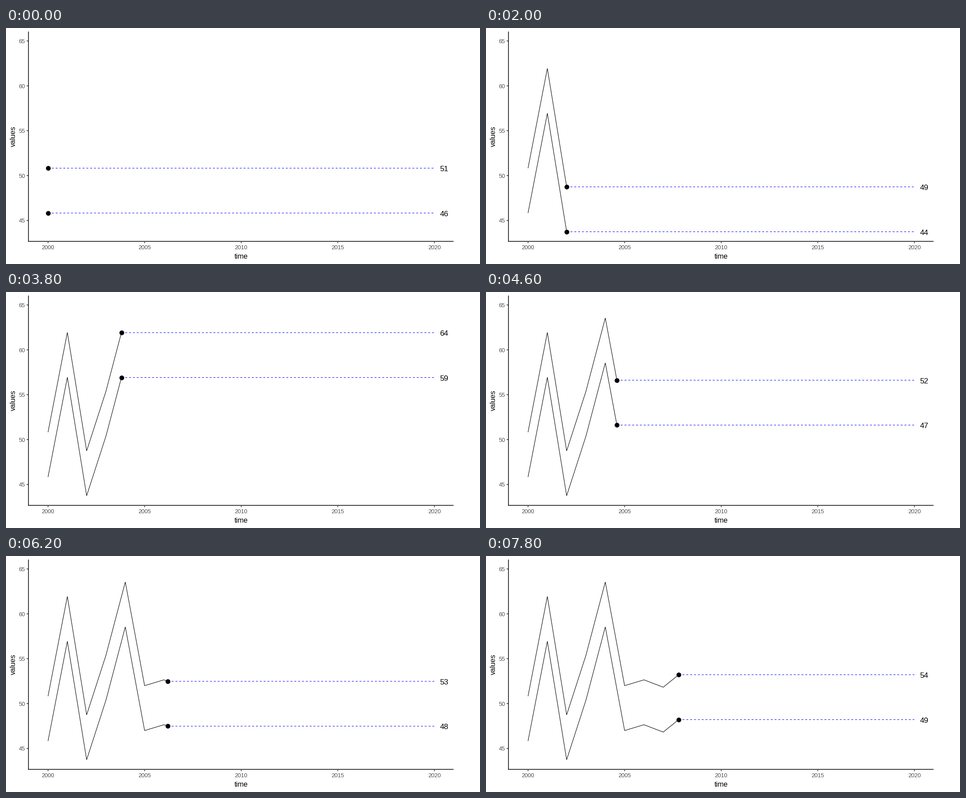
Recreate the animation shown at these times as a matplotlib script. Size 1058x529 px, loop 8 s.

```python
import matplotlib.pyplot as plt
import numpy as np
from matplotlib.animation import FuncAnimation

W, H, DPI = 1058, 529, 64
PT = 72 / DPI                      # points per pixel
FRAMES, INTERVAL = 40, 200
STEPS_PER_YEAR = 5
LOWER_OFFSET = -5
LINE_WIDTH = 1.07

YEARS = np.arange(9)               # years since 2000
VALUES = np.array([50.81, 61.92, 48.73, 55.38, 63.53,
                   51.98, 52.63, 51.81, 53.55])

plt.rcParams["font.family"] = "Liberation Sans"
plt.rcParams["toolbar"] = "None"


def px(year):
    return 93.8 + 43.12 * np.asarray(year)


def py(value):
    return 28.7 + 20.12 * (65 - np.asarray(value))


fig = plt.figure(figsize=(W / DPI, H / DPI), dpi=DPI, facecolor="white")
ax = fig.add_axes([0, 0, 1, 1])
ax.set_xlim(0, W)
ax.set_ylim(H, 0)
ax.axis("off")


def stroke(xs, ys, color="black", width=LINE_WIDTH, **kw):
    line, = ax.plot(xs, ys, color=color, lw=width * PT, snap=False, **kw)
    return line


def label(x, y, text, size, color="black", ha="center", **kw):
    return ax.text(x, y, text, fontsize=size * PT, color=color, ha=ha,
                   va="baseline", **kw)


def draw_axes():
    axis = dict(width=1.5, solid_capstyle="butt")
    stroke([50.2, 50.2], [8, 479], **axis)
    stroke([49.5, 999], [478.3, 478.3], **axis)
    for value in range(45, 70, 5):
        y = py(value) + 0.3
        stroke([46, 50], [y, y], "#333333", **axis)
        label(42.8, y + 5, str(value), 12.8, "#4d4d4d", "right")
    for year in range(0, 25, 5):
        x = px(year)
        stroke([x, x], [478, 482.4], "#333333", **axis)
        label(x, 496.2, str(2000 + year), 12.8, "#4d4d4d")
    label(524.6, 516.8, "time", 16)
    label(21.2, 243, "values", 16, rotation=90, rotation_mode="anchor")


class Series:
    """A growing line with a dot, a dashed guide and a value label."""

    def __init__(self, values):
        self.values = values
        self.guide = stroke([], [], "blue", dashes=(4, 4),
                            dash_capstyle="butt", zorder=2)
        self.line = stroke([], [], solid_joinstyle="miter",
                           solid_capstyle="butt", zorder=3)
        self.dot = stroke([], [], marker="o", ms=10.6 * PT, mew=0, zorder=4)
        self.text = label(978, 0, "", 17)

    def update(self, t):
        value = np.interp(t, YEARS, self.values)
        x, y = px(t), py(value)
        past = YEARS < t
        self.line.set_data(np.append(px(YEARS[past]), x),
                           np.append(py(self.values[past]), y))
        self.guide.set_data([x, px(20)], [y, y])
        self.dot.set_data([x], [y])
        # the label jumps to the nearest year's value
        self.text.set_text(f"{self.values[int(t + 0.5)]:.0f}")
        self.text.set_y(y + 7)
        return self.line, self.guide, self.dot, self.text


draw_axes()
series = [Series(VALUES), Series(VALUES + LOWER_OFFSET)]


def update(frame):
    t = frame / STEPS_PER_YEAR
    return [artist for s in series for artist in s.update(t)]


anim = FuncAnimation(fig, update, frames=FRAMES, interval=INTERVAL,
                     repeat=True, repeat_delay=0, blit=False)
plt.show()
```
